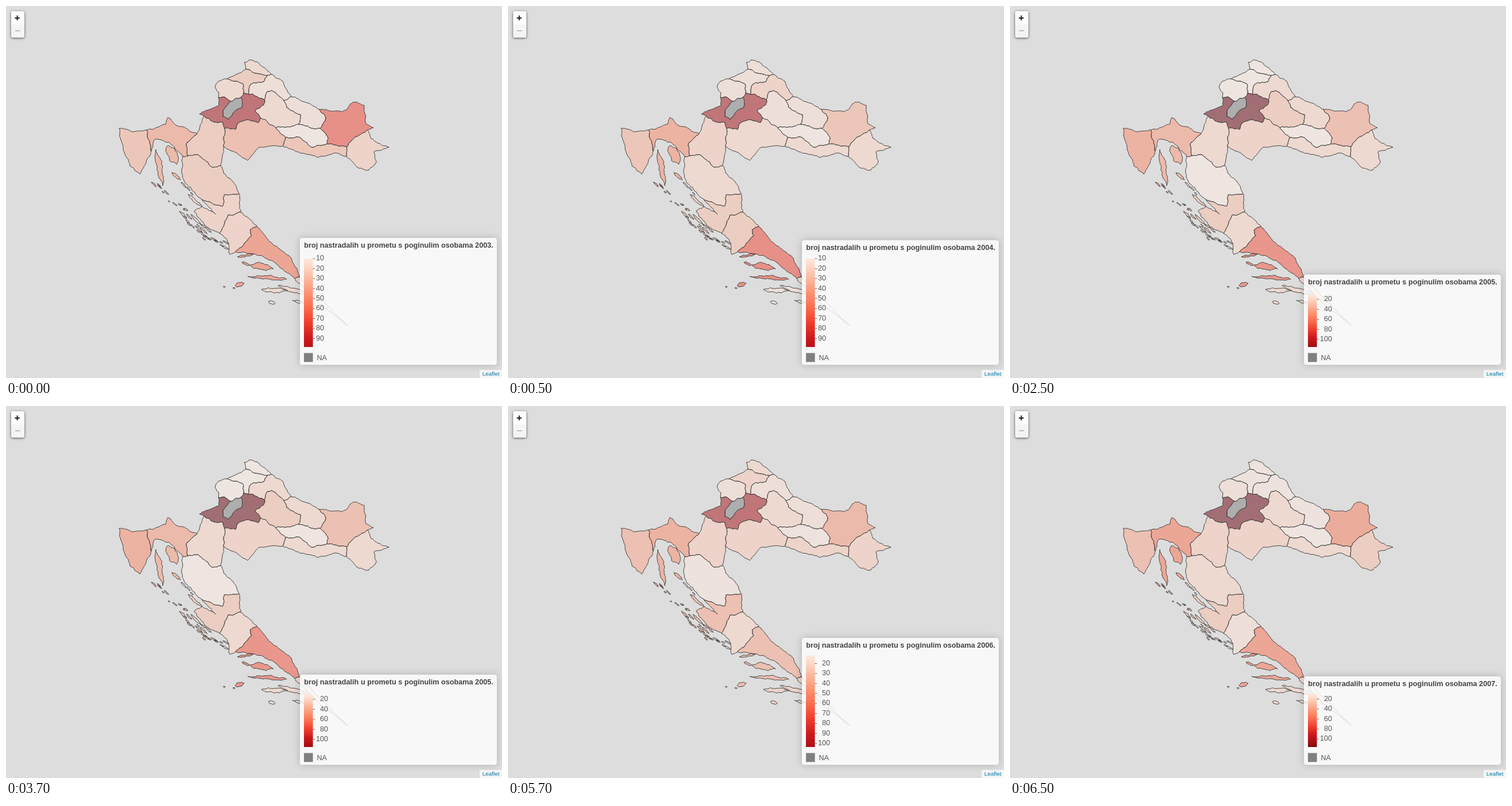
An HTML page that plays this animation: 864x648 px, repeating every 8 s.

```html
<!DOCTYPE html>
<html lang="hr">
<head>
<meta charset="utf-8">
<title>Karta po županijama</title>
<style>
html, body { margin: 0; width: 100%; height: 100%; overflow: hidden; background: #ddd; }
body { position: relative; font-family: Arial, "Liberation Sans", sans-serif; }
svg, div { position: absolute; }
svg { left: 0; top: 0; }
#map path { fill-opacity: .5; stroke: #444; stroke-linejoin: round; }
#panel { left: 512.2px; width: 342.6px; bottom: 22.6px; border-radius: 4.5px;
  background: rgba(255,255,255,.8); box-shadow: 0 0 13.5px rgba(0,0,0,.2); }
#zoom { left: 9px; top: 9px; width: 23px; height: 46.4px; border-radius: 3.6px;
  box-shadow: 0 1px 4.5px rgba(0,0,0,.65); overflow: hidden;
  background: linear-gradient(#fff 22.6px, #ccc 22.6px 23.5px, #f4f4f4 23.5px); }
#credit { right: 0; bottom: 0; height: 14px; padding: 0 4.5px; font-size: 9.9px;
  line-height: 14px; color: #0078a8; background: rgba(255,255,255,.7); }
#ui text { font-size: 12.6px; fill: #555; }
#ui .title { font-size: 12.68px; font-weight: bold; fill: #444; }
#ui .btn { font: bold 17px "Liberation Mono", monospace; fill: #111; text-anchor: middle; }
#ui .off { fill: #bbb; }
#labels { text-anchor: end; }
</style>
</head>
<body>
<svg id="map" width="864" height="648"></svg>
<div id="zoom"></div>
<div id="panel"></div>
<div id="credit">Leaflet</div>
<svg id="ui" width="864" height="648">
  <linearGradient id="reds" gradientUnits="userSpaceOnUse" x1="0" x2="0"></linearGradient>
  <text class="btn" x="19.6" y="25.5">+</text>
  <text class="btn off" x="20" y="48.5">−</text>
  <text class="title" id="title" x="519.3"></text>
  <rect id="bar" x="519" width="15.6" fill="url(#reds)"/>
  <g id="labels"></g>
  <rect x="519" y="604.5" width="15.6" height="15.6" fill="#808080"/>
  <text x="541.5" y="616.5">NA</text>
</svg>
<script>
const $ = id => document.getElementById(id);
const BAR_END = 594, TICK_GAP = 17.4;

let seed = 11;
const rand = () => (seed = seed * 16807 % 2147483647) / 2147483647;

// Fractal line: each span is bent at its middle until it is short
function bend(a, b) {
  const dx = b[0] - a[0], dy = b[1] - a[1], len = Math.hypot(dx, dy);
  if (len < 4) return [b];
  const off = (rand() - .5) * Math.min(.3, 3 / len);
  const mid = [(a[0] + b[0]) / 2 - dy * off, (a[1] + b[1]) / 2 + dx * off];
  return [...bend(a, mid), ...bend(mid, b)];
}
const rough = pts => pts.flatMap((p, i) => i ? bend(pts[i - 1], p) : [p]);
const points = text => text.split(' ').map(p => p.split(',').map(Number));
const ring = pts => 'M' + pts.map(p => p.map(v => v.toFixed(1))).join('L') + 'Z';

// Points where borders meet, named a-z then A-N
const joints = {};
points('418,110 455,121 462,119 385,127 414,151 422,154 370,159 391,166 409,159 450,163 ' +
  '484,165 497,158 443,194 381,213 345,192 379,245 470,212 487,229 482,244 510,206 ' +
  '547,213 546,180 559,240 594,245 630,216 593,262 374,278 406,327 409,359 340,336 ' +
  '437,384 372,396 400,428 511,472 503,475 308,262 317,261 333,222 245,216 253,253')
  .forEach((p, i) => joints[String.fromCharCode(i < 26 ? 97 + i : 39 + i)] = p);

// Each border: the two counties (_ is outside), its two joints, key points between
const inland = `MV ab 433,117|MQ bc|VK de 401,131 413,136|VZ ef|VQ fb 424,140 430,134 449,132
KZ gh 379,158|KC hi|KZ ie|ZC hi 381,178 378,193 387,198 397,185 411,175|ZQ fj 431,154
QB jk 455,149 463,147|QW kl|ZB jm 449,172 434,183|ZS mn 440,203 420,198 403,205 400,215
ZA no 378,203 362,202|BS mq|BP qt|BW kt 489,177 513,189|WP tu 530,212|WO uv 557,196
OP uw 561,230|SP qr|SR rs|PR rw 508,228 532,246|OR wx|OU xy 607,229|RU xz|AS np
AG KL 315,238|AL KA 331,259 360,281|LG JK|GI MN|DL BD 380,329 377,349 362,346
DH CF 387,364 380,380|HT EG 425,390 428,400 418,411|TN HI`;
const outer = `M_ ac 415,98 424,94 441,100 454,111|V_ da 399,120|K_ gd 371,151 364,142 370,131
Z_ og 337,188 371,173|Q_ cl 482,131|W_ lv 520,167|O_ vy 586,184 605,167 624,173 627,205 640,212
U_ yz 636,231 667,246 641,254 645,272 632,286 614,282|R_ zs 571,256 543,264 495,249
S_ sp 441,246 421,269 402,256|A_ pA 377,262|A_ oL 338,207|G_ ML 278,206 282,194 297,208
G_ JN 283,237 260,232|I_ NM 250,262 233,293 216,279 204,250 197,213 222,219
L_ AB 379,291 399,311|L_ DJ 310,304 306,285|D_ BC|D_ FD 352,386 328,358 342,349 365,363
H_ CE|H_ GF 390,433 388,413|T_ EH 467,417 496,438|T_ IG 470,448 432,432|N_ HI 548,511 595,556 550,522`;

const arcs = [inland, outer].flatMap(t => t.split(/[|\n]/)).map(line => {
  const [key, [from, to], ...mid] = line.split(' ');
  return { key, pts: rough([joints[from], ...mid.flatMap(points), joints[to]]) };
});

// Joins the borders of one county end to end
function outline(id) {
  const left = arcs.filter(a => a.key.includes(id)).map(a => a.pts);
  let pts = left.shift();
  while (left.length) {
    const end = pts.at(-1) + '';
    const i = left.findIndex(a => a[0] + '' === end || a.at(-1) + '' === end);
    const [next] = left.splice(i, 1);
    pts = pts.concat(next[0] + '' === end ? next : next.slice().reverse());
  }
  return ring(pts);
}

// A long island from one tip to the other, w wide
function island([x, y, X, Y, w]) {
  const dx = X - x, dy = Y - y, len = Math.hypot(dx, dy);
  const at = (t, s) => [x + dx * t - dy / len * w * s, y + dy * t + dx / len * w * s];
  return ring(rough([[x, y], at(.2, .45), at(.7, .5), [X, Y], at(.75, -.45), at(.25, -.5), [x, y]]));
}

// n narrow islets scattered along a line, lying in its direction
function islets([x, y, X, Y, n, spread, size]) {
  const a = Math.atan2(Y - y, X - x), c = Math.cos(a), s = Math.sin(a);
  return Array.from({ length: n }, (_, i) => {
    const t = (i + rand()) / n, off = (rand() - .5) * spread, r = size * (.3 + rand() * .7) / 2;
    const cx = x + (X - x) * t - s * off, cy = y + (Y - y) * t + c * off;
    return island([cx - c * r, cy - s * r, cx + c * r, cy + s * r, 1.5 + r / 8]);
  });
}

const islands = {
  G: '261,250,273,313,9 282,243,297,276,17 289,290,304,303,5',
  D: '317,328,342,350,5 322,363,342,383,3 340,380,358,394,3',
  T: '403,437,431,432,4 411,446,424,452,4 425,451,466,458,11 421,471,489,476,5 399,487,415,483,7',
  N: '445,494,491,496,8 474,487,532,504,6 499,513,536,520,4 457,515,469,518,5'
};
const belts = {
  G: '257,306,280,328,5,6,12',
  L: '304,306,328,332,3,5,16',
  D: '284,338,316,358,7,10,9 306,362,350,405,12,12,19',
  H: '347,398,386,419,10,10,15',
  T: '373,488,398,492,2,2,5'
};

const ids = 'MVKQZCBWOPRUSAGILDHTN';
const shapes = [...ids].map(id => {
  const path = document.createElementNS('http://www.w3.org/2000/svg', 'path');
  const isles = islands[id] ? points(islands[id]).map(island) : [];
  const small = belts[id] ? points(belts[id]).flatMap(islets) : [];
  path.setAttribute('d', [outline(id), ...isles, ...small].join(''));
  return $('map').appendChild(path);
});

const ramp = ['#fff5f0', '#fee0d2', '#fcbba1', '#fc9272', '#fb6a4a', '#ef3b2c', '#cb181d', '#a50f15', '#67000d'];
$('reds').innerHTML = ramp.map((c, i) => `<stop offset="${i / 8}" stop-color="${c}"/>`).join('');

// Letters a-z run evenly along the ramp, - has no value
function tone(letter) {
  if (letter === '-') return '#808080';
  const t = (letter.charCodeAt(0) - 97) / 25 * 8, i = Math.min(7, Math.floor(t));
  return `color-mix(in srgb, ${ramp[i + 1]} ${(t - i) * 100}%, ${ramp[i]})`;
}

// tones follow ids; hi is where the bar ends on the ramp
const years = [
  { tones: 'egedw-edpbhfigjhgffme', top: 404, bar: 440, tick: 440, first: 10, step: 10, hi: .82 },
  { tones: 'dddfw-ddhbeeefkheggpd', top: 407.5, bar: 440, tick: 440, first: 10, step: 10, hi: .82 },
  { tones: 'bbbez-geibeefejkbgeoe', top: 467.8, bar: 503, tick: 511, first: 20, step: 20, hi: .89 },
  { tones: 'efddw-edjcffffkicieif', top: 404, bar: 434.5, tick: 448.5, first: 20, step: 10, hi: .855 },
  { tones: 'ccdcz-eclbegffmiegdme', top: 471, bar: 502, tick: 510.5, first: 20, step: 20, hi: .95 }
];

function show(n) {
  const { tones, top, bar, tick, first, step, hi } = years[n], lo = .09;
  shapes.forEach((s, i) => s.style.fill = tone(tones[i]));
  $('panel').style.top = top + 'px';
  $('title').textContent = `broj nastradalih u prometu s poginulim osobama ${2003 + n}.`;
  $('title').setAttribute('y', top + 17.4);
  const height = BAR_END - bar, full = height / (hi - lo), start = bar - lo * full;
  $('bar').setAttribute('y', bar);
  $('bar').setAttribute('height', height);
  $('reds').setAttribute('y1', start);
  $('reds').setAttribute('y2', start + full);
  const count = Math.floor((BAR_END - tick) / TICK_GAP) + 1;
  const right = first + step * (count - 1) > 99 ? 561 : 554;
  let html = '';
  for (let i = 0; i < count; i++) {
    const y = tick + i * TICK_GAP;
    html += `<path d="M534.6 ${y}h3.6" stroke="#555" stroke-width=".9"/>` +
      `<text x="${right}" y="${y + 3.3}">${first + i * step}</text>`;
  }
  $('labels').innerHTML = html;
}

let current;
function frame() {
  const t = performance.now() % 8000;
  const n = Math.floor((t + 1500) / 2000);
  if (n !== current) show(current = n);
  requestAnimationFrame(frame);
}
frame();
</script>
</body>
</html>
```
